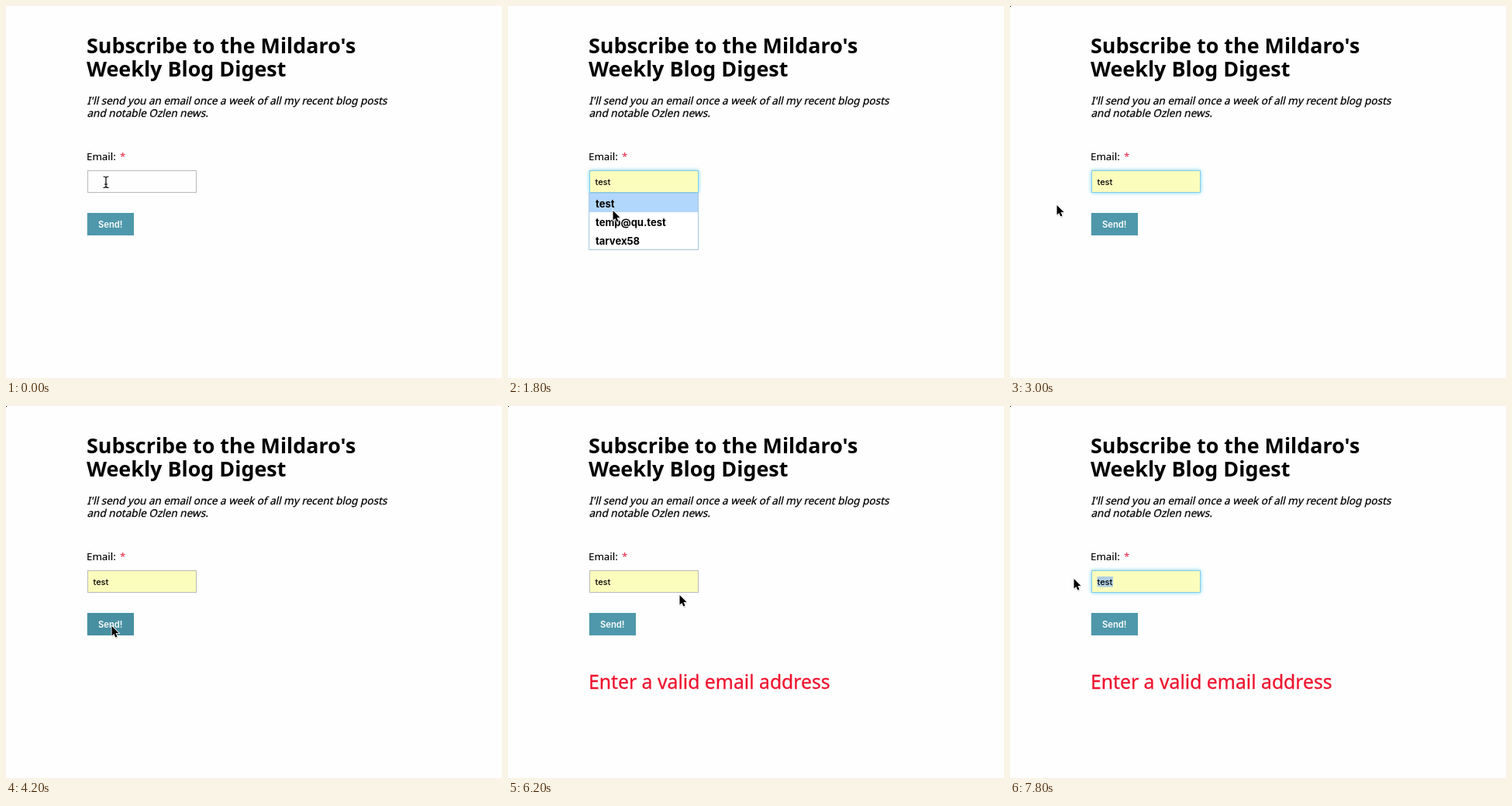
Write an HTML page that moves like this. It is 640 px wide and 480 px high and loops after 8000 ms.

```html
<!DOCTYPE html>
<html lang="en">
<head>
<meta charset="utf-8">
<title>Newsletter form</title>
<style>
  html, body { margin: 0; width: 100%; height: 100%; overflow: hidden; background: #fefefe; }
  svg { display: block; width: 640px; height: 480px; font: 13.3px "Noto Sans", "Open Sans", sans-serif; }
  .title { font-size: 26.9px; font-weight: 700; }
  .intro { font-size: 13.56px; stroke: #000; stroke-width: .25px; }
  .label { stroke: #000; stroke-width: .15px; }
  .error { font-size: 24.75px; fill: #ee142f; stroke: #ee142f; stroke-width: .3px; }
  .field { font: 500 11px Inter, Roboto, sans-serif; }
  .button { font: 600 11.2px Inter, Roboto, sans-serif; fill: #fff; }
  .option { font: 700 13px Inter, Roboto, sans-serif; }
  #glow { filter: drop-shadow(0 0 2.5px #6fd2f5); }
</style>
</head>
<body>
<svg viewBox="0 0 640 480">
  <rect width="640" height="480" fill="#fefefe"/>
  <rect id="corner" width="1" height="1"/>

  <g class="title">
    <text x="104" y="61">Subscribe to the Mildaro's</text>
    <text x="104" y="91">Weekly Blog Digest</text>
  </g>
  <g class="intro" transform="translate(104.5 127) skewX(-13)">
    <text>I'll send you an email once a week of all my recent blog posts</text>
    <text x="3.7" y="16">and notable Ozlen news.</text>
  </g>
  <text class="label" x="104" y="199">Email: <tspan x="147" fill="#e0203c" stroke="none">*</tspan></text>

  <rect id="glow" x="105" y="212" width="141" height="29" fill="#fff"/>
  <rect id="box" x="105.5" y="212.5" width="140" height="28"/>
  <rect id="selection" x="112.5" y="220" width="20.5" height="13.5" fill="#b0d0e4"/>
  <text id="value" class="field" x="112.5" y="231"></text>
  <path id="caret" d="M0 221v12" stroke="#000"/>

  <rect id="button" x="104.8" y="267" width="60.2" height="29"/>
  <text class="button" x="119" y="286">Send!</text>
  <text id="error" class="error" x="104" y="365">Enter a valid email address</text>

  <g id="menu" class="option">
    <rect x="104.5" y="241.5" width="141" height="73" fill="#fff" stroke="#a3c9e0"/>
    <rect id="highlight" x="105" y="242" width="140" height="24" fill="#b2d7fc"/>
    <text x="113" y="259.5">test</text>
    <text x="113" y="283.5">temp@qu.test</text>
    <text x="113" y="307.5">tarvex58</text>
  </g>

  <g id="arrow">
    <path d="M1.3 3v12.5l2.8-2.6 2 4.5 2.2-1-2-4.4h4z" fill="#000" opacity=".18"/>
    <path d="M.5 1v12.5l2.8-2.6 2 4.5 2.2-1-2-4.4h4z" stroke="#fff" stroke-width="1.6" paint-order="stroke"/>
  </g>
  <path id="beam" d="M-3.5-7q3 0 3.5 1.5q.5-1.5 3.5-1.5M-3.5 7.5q3 0 3.5-1.5q.5 1.5 3.5 1.5M0-5.5v11.5M-2 3h4"
        fill="none" stroke="#000" stroke-width="1.2"/>
</svg>
<script>
  const LOOP = 8000, STEP = 200;
  const el = id => document.getElementById(id);
  const show = (id, on) => el(id).setAttribute("visibility", on ? "visible" : "hidden");
  const paint = (id, name, value) => el(id).setAttribute(name, value);

  // Pointer stops: time, x, y
  const path = [
    [0, 129, 227], [1400, 129, 227], [1600, 134, 255], [1800, 135, 263], [2600, 135, 262],
    [3000, 60, 256], [3400, 61, 257], [3600, 108, 274], [4000, 136, 283], [4800, 136, 283],
    [5200, 205, 372], [5400, 240, 399], [5600, 240, 399], [6200, 221, 243],
    [6600, 142, 228], [6800, 138, 228], [7200, 88, 224], [7400, 82, 222], [8000, 82, 222]
  ];

  function pointerAt(t) {
    const i = path.findIndex(p => p[0] > t);
    const [t0, x0, y0] = path[i - 1], [t1, x1, y1] = path[i];
    const k = (t - t0) / (t1 - t0), ease = k * k * (3 - 2 * k);
    return [x0 + (x1 - x0) * ease, y0 + (y1 - y0) * ease];
  }

  function draw(t) {
    const within = (from, to = LOOP) => t >= from && t < to;
    const [x, y] = pointerAt(t);
    const focused = within(600, 3400) || within(6800);
    const filled = t >= 1600;
    const overField = x > 105 && x < 246 && y > 212 && y < 241;
    const overButton = within(3600) && x > 105 && x < 165 && y > 267 && y < 296;
    const typing = within(1000, 1600);

    show("corner", t >= 2200);
    show("glow", focused);
    paint("box", "fill", filled ? "#fbfdbd" : "#fefefe");
    paint("box", "stroke", focused ? "#82cde6" : "#b9b9b9");
    el("value").textContent = filled ? "test" : t >= 1200 ? "t" : "";
    show("caret", within(600, 1600));
    paint("caret", "transform", `translate(${t >= 1200 ? 117.5 : 113.5})`);
    show("selection", t >= 7000);
    paint("selection", "x", t < 7200 ? 122 : 112.5);
    paint("selection", "width", t < 7200 ? 11 : 20.5);

    paint("button", "fill", overButton ? "#488fa2" : "#4f98ab");
    show("error", t >= 4600);
    el("menu").style.display = within(1200, 2600) ? "" : "none";
    show("highlight", filled);

    show("beam", overField && !typing);
    show("arrow", !overField && !typing);
    for (const id of ["beam", "arrow"]) paint(id, "transform", `translate(${x} ${y})`);
  }

  function tick() {
    draw(Math.floor(performance.now() % LOOP / STEP) * STEP);
    requestAnimationFrame(tick);
  }
  tick();
</script>
</body>
</html>
```
